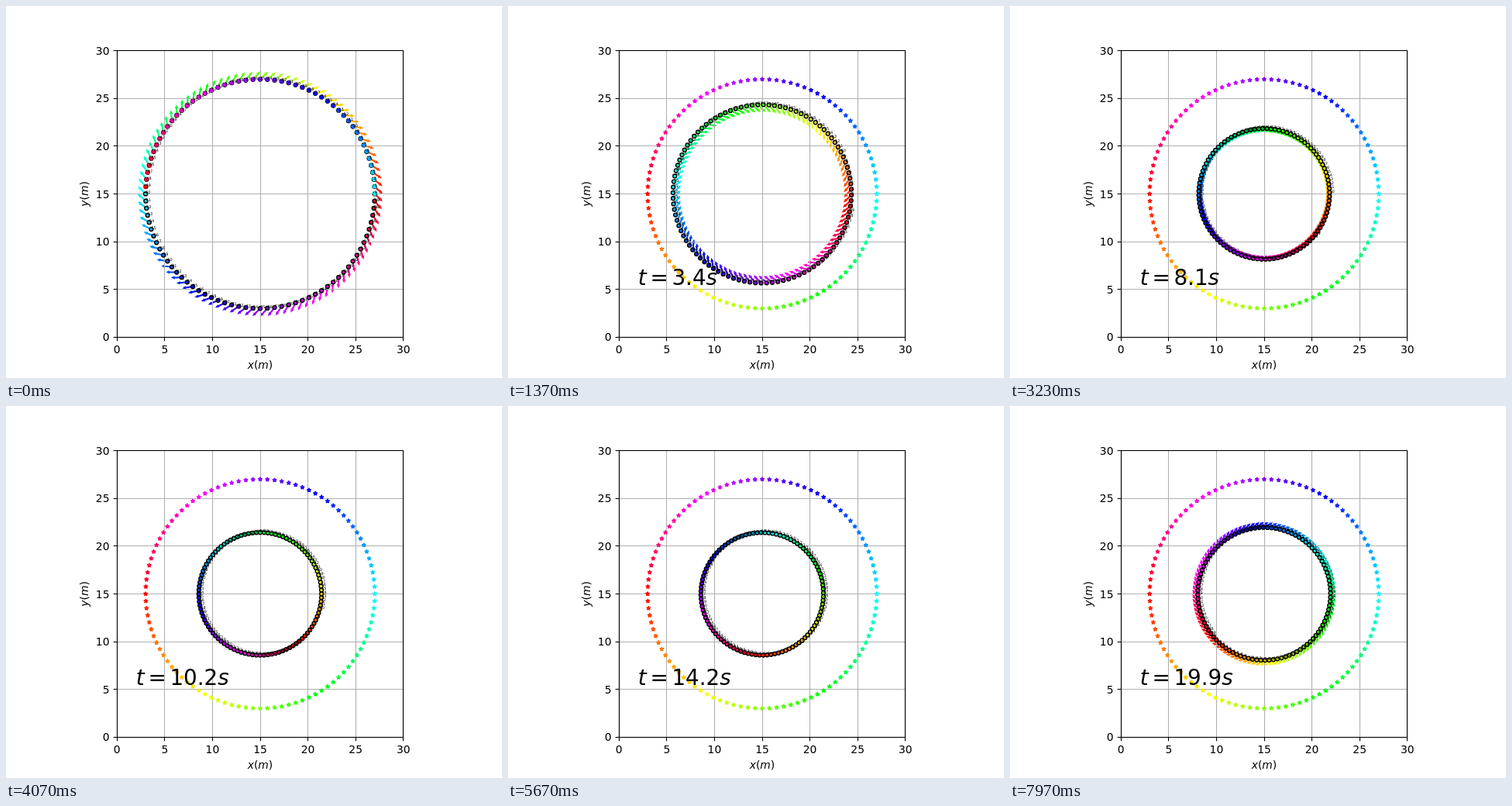
Animation, 640 px wide and 480 px high, one loop 8 s. Source, as an HTML page with a canvas:

```html
<!DOCTYPE html>
<html lang="en">
<head>
<meta charset="utf-8">
<title>Circle crossing</title>
<style>
  html, body { margin: 0; width: 100%; height: 100%; overflow: hidden; background: #fff; }
  canvas { display: block; }
</style>
</head>
<body>
<canvas id="stage" width="640" height="480"></canvas>
<script>
const ctx = document.getElementById('stage').getContext('2d');

const COUNT = 100, LOOP = 8000, TAU = 2 * Math.PI;
const UNIT = 12.32;            // pixels per metre
const PT = 100 / 72;           // pixels per typographic point
const GOAL_RADIUS = 12, BODY_RADIUS = 0.2;
const px = x => 143.2 + x * UNIT;
const py = y => 427.2 - y * UNIT;
const snap = v => Math.floor(v) + 0.5;
const colours = Array.from({ length: COUNT }, (_, i) => `hsl(${360 * i / COUNT} 100% 50%)`);

// seconds, ring radius in metres, clockwise rotation in turns
const keys = [
  [0, 12, 0], [0.5, 12, 0], [1, 11.88, 0.003], [1.6, 11.15, 0.007],
  [2.1, 10.33, 0.009], [3.4, 9.34, 0.022], [4.2, 8.85, 0.032], [6.2, 7.6, 0.065],
  [8.4, 6.77, 0.102], [10.2, 6.43, 0.14], [11, 6.42, 0.165], [14.2, 6.42, 0.267],
  [16.9, 6.42, 0.333], [18.9, 6.65, 0.371], [19.9, 6.95, 0.388], [20.9, 7.35, 0.403]
];

// Monotone cubic interpolation through one column of the keys
function curve(column) {
  const secant = i => (keys[i + 1][column] - keys[i][column]) / (keys[i + 1][0] - keys[i][0]);
  const last = keys.length - 1;
  const slopes = keys.map((_, i) => {
    if (i === 0) return secant(0);
    if (i === last) return secant(last - 1);
    const a = secant(i - 1), b = secant(i);
    return a * b > 0 ? 2 * a * b / (a + b) : 0;
  });
  return t => {
    let i = 0;
    while (i < last - 1 && t > keys[i + 1][0]) i++;
    const h = keys[i + 1][0] - keys[i][0], u = (t - keys[i][0]) / h, v = 1 - u;
    return v * v * ((1 + 2 * u) * keys[i][column] + u * h * slopes[i])
         + u * u * ((3 - 2 * u) * keys[i + 1][column] - v * h * slopes[i + 1]);
  };
}
const ringRadius = curve(1), ringTurn = curve(2);

// Heading relative to the outward radius: turn on the spot, then follow the path
function heading(t) {
  if (t < 1.6) return -Math.PI / 4 - 1.4 * t;
  const d = 0.05;
  const radial = ringRadius(t + d) - ringRadius(t - d);
  const tangential = ringRadius(t) * TAU * (ringTurn(t + d) - ringTurn(t - d));
  return Math.atan2(-tangential, radial);
}

function polygon(points) {
  ctx.beginPath();
  points.forEach(([x, y]) => ctx.lineTo(x, y));
  ctx.closePath();
  ctx.fill();
  ctx.stroke();
}

function line(x1, y1, x2, y2) {
  ctx.beginPath();
  ctx.moveTo(x1, y1);
  ctx.lineTo(x2, y2);
  ctx.stroke();
}

const arrowShape = [[0, .1], [0, -.1], [.8, -.1], [.8, -.3], [1, 0], [.8, .3], [.8, .1]]
  .map(([x, y]) => [x * UNIT, y * 0.3 * UNIT]);
const starShape = Array.from({ length: 10 }, (_, k) => {
  const r = 2 * PT * (k % 2 ? 0.381 : 1), a = k * TAU / 10;
  return [r * Math.sin(a), -r * Math.cos(a)];
});

function drawArrow(agent, direction) {
  ctx.save();
  ctx.translate(agent.x, agent.y);
  ctx.rotate(-direction);
  ctx.fillStyle = ctx.strokeStyle = agent.colour;
  ctx.lineWidth = PT;
  polygon(arrowShape);
  ctx.restore();
}

function drawGoal(agent) {
  ctx.save();
  ctx.translate(agent.goalX, agent.goalY);
  ctx.fillStyle = ctx.strokeStyle = agent.colour;
  ctx.lineWidth = PT;
  ctx.lineJoin = 'bevel';
  polygon(starShape);
  ctx.restore();
}

function drawBody(agent) {
  ctx.beginPath();
  ctx.arc(agent.x, agent.y, BODY_RADIUS * UNIT, 0, TAU);
  ctx.fillStyle = agent.colour;
  ctx.strokeStyle = '#000';
  ctx.lineWidth = PT;
  ctx.fill();
  ctx.stroke();
}

function setFont(size, style = '') {
  ctx.font = `${style} ${size}px "DejaVu Sans", sans-serif`;
}

// Letters are slanted, everything else is upright
function mathText(text, size, x, y) {
  ctx.textAlign = 'left';
  for (const c of text) {
    setFont(size, /[a-z]/.test(c) ? 'italic' : '');
    const gap = c === '=' ? 0.17 * size : 0;
    ctx.fillText(c, x + gap, y);
    x += ctx.measureText(c).width + 2 * gap;
  }
}

function drawGrid() {
  ctx.strokeStyle = '#b0b0b0';
  ctx.lineWidth = 0.8 * PT;
  for (let v = 0; v <= 30; v += 5) {
    line(snap(px(v)), py(0), snap(px(v)), py(30));
    line(px(0), snap(py(v)), px(30), snap(py(v)));
  }
}

function drawAxes() {
  const left = snap(px(0)), right = snap(px(30)), top = snap(py(30)), bottom = snap(py(0));
  const size = 10 * PT, tick = 3.5 * PT;
  ctx.strokeStyle = ctx.fillStyle = '#000';
  ctx.lineWidth = 0.8 * PT;
  setFont(size);
  for (let v = 0; v <= 30; v += 5) {
    const x = snap(px(v)), y = snap(py(v));
    line(x, bottom, x, bottom + tick);
    line(left, y, left - tick, y);
    ctx.textAlign = 'center';
    ctx.fillText(v, px(v), 447.6);
    ctx.textAlign = 'right';
    ctx.fillText(v, 133.5, py(v) + 5.2);
  }
  ctx.strokeRect(left, top, right - left, bottom - top);
  mathText('x(m)', size, 311.7, 467.8);
  ctx.save();
  ctx.translate(106, 258.7);
  ctx.rotate(-Math.PI / 2);
  mathText('y(m)', size, 0, 0);
  ctx.restore();
}

function draw(step) {
  const t = step / 10, radius = ringRadius(t), turn = ringTurn(t), course = heading(t);
  const agents = colours.map((colour, i) => {
    const start = TAU * i / COUNT, angle = start - TAU * turn;
    return {
      colour, angle,
      x: px(15 + radius * Math.cos(angle)),
      y: py(15 + radius * Math.sin(angle)),
      goalX: px(15 - GOAL_RADIUS * Math.cos(start)),
      goalY: py(15 - GOAL_RADIUS * Math.sin(start))
    };
  });

  ctx.fillStyle = '#fff';
  ctx.fillRect(0, 0, 640, 480);
  agents.forEach(agent => drawArrow(agent, agent.angle + course));
  drawGrid();
  if (step === 0) {
    agents.forEach(agent => { drawBody(agent); drawGoal(agent); });
  } else {
    agents.forEach(drawGoal);
    agents.forEach(drawBody);
  }
  drawAxes();

  setFont(5);
  ctx.textAlign = 'left';
  agents.forEach((agent, i) => ctx.fillText(i, agent.x, agent.y));
  if (step > 0) mathText(`t=${t.toFixed(1)}s`, 20 * PT, px(2), 359.6);
}

// 25 simulation steps per second shown on a 30 Hz clock
function frame() {
  const slot = Math.floor((performance.now() % LOOP) * 0.03 + 0.15);
  draw(Math.min(199, Math.floor((slot + 0.5) / 1.2)));
  requestAnimationFrame(frame);
}
frame();
</script>
</body>
</html>
```
